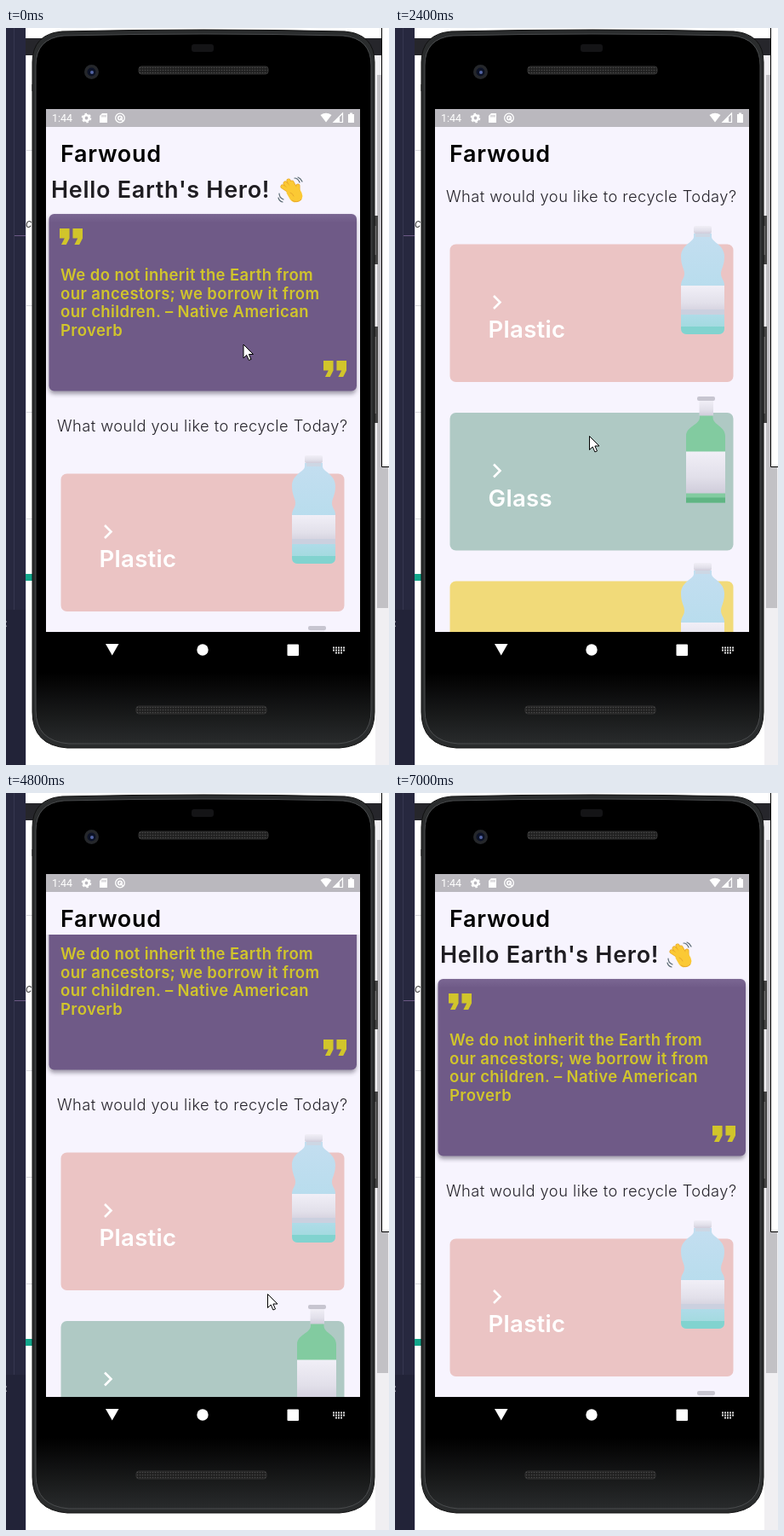
Write an HTML page that moves like this. It is 450 px wide and 864 px high and loops after 7.6 s.

```html
<!DOCTYPE html>
<html lang="en">
<head>
<meta charset="utf-8">
<title>Recycling app</title>
<style>
  html, body { margin: 0; width: 100%; height: 100%; overflow: hidden; background: #fff; }
  svg { display: block; width: 100vw; height: 100vh; }
  text { font-family: Inter, "Open Sans", sans-serif; white-space: pre; }
  .title { font-size: 27px; font-weight: 600; letter-spacing: .7px; }
  .hello { font-size: 27px; font-weight: 600; letter-spacing: .7px; fill: #1f1d22; }
  .quote { font-size: 18.5px; font-weight: 600; letter-spacing: .4px; fill: #d1c52b; }
  .ask { font-size: 18.3px; font-weight: 300; letter-spacing: .45px; fill: #26242b; }
  .label { font-size: 27.5px; font-weight: 600; letter-spacing: .3px; fill: #fff; }
  .clock { font: 12.5px Roboto, sans-serif; fill: #fff; }
</style>
</head>
<body>
<svg viewBox="0 0 450 864" preserveAspectRatio="none">
  <defs>
    <clipPath id="view"><rect x="47" y="166" width="369" height="542"/></clipPath>
    <linearGradient id="shell" x2="0" y2="1">
      <stop offset=".9" stop-color="#000"/><stop offset="1" stop-color="#292b2c"/>
    </linearGradient>
    <linearGradient id="card" x2="0" y2="1">
      <stop offset="0" stop-color="#7b6793"/><stop offset=".05" stop-color="#6f5a87"/>
    </linearGradient>
    <linearGradient id="paper" x2="0" y2="1">
      <stop offset="0" stop-color="#f1eff7"/><stop offset=".6" stop-color="#e2e0ea"/>
      <stop offset="1" stop-color="#cfccda"/>
    </linearGradient>
    <linearGradient id="water" x2="0" y2="1">
      <stop offset="0" stop-color="#c3def0"/><stop offset=".75" stop-color="#b4dcec"/>
      <stop offset="1" stop-color="#9ddadb"/>
    </linearGradient>
    <filter id="soft" x="-10%" y="-10%" width="120%" height="125%"><feGaussianBlur stdDeviation="2.5"/></filter>
    <pattern id="mesh" width="3" height="3" patternUnits="userSpaceOnUse">
      <rect width="3" height="3" fill="#202020"/><circle cx="1.5" cy="1.5" r=".8" fill="#484848"/>
    </pattern>

    <path id="marks" fill="#d1c52b" transform="scale(1.93 1.9)" d="M1 10h3l2-4V0H0v6h3zm8 0h3l2-4V0H8v6h3z"/>
    <path id="fingers" d="M334 192l-9-6M336 191l-8-9M338 190l-6-11M341 190l-5-9M343 195v-10"/>

    <g id="plastic">
      <path d="M351 510h21v4c0 6 15 9 15 23 0 11-4 14-4 20s4 7 4 14v50q0 7-7 7h-37q-7 0-7-7v-50c0-7 4-8 4-14s-4-9-4-20c0-14 15-17 15-23z" fill="url(#water)"/>
      <path d="M336 619h51v2q0 7-7 7h-37q-7 0-7-7z" fill="#81d3cf"/>
      <rect x="336" y="571" width="51" height="34" fill="url(#paper)"/>
      <rect x="336" y="599" width="51" height="6" fill="#cbd0df"/>
      <rect x="351" y="501" width="21" height="9" rx="2" fill="url(#paper)"/>
      <rect x="353" y="510" width="17" height="4" fill="#cdd7e4"/>
    </g>
    <g id="glass">
      <path d="M358 525h15.500v3c0 9 14.500 10 14.500 22v78h-46v-78c0-12 16-13 16-22z" fill="#82cba0"/>
      <rect x="342" y="622" width="46" height="6" fill="#5fb583"/>
      <rect x="342" y="568" width="46" height="49" fill="url(#paper)"/>
      <rect x="357.500" y="508" width="16.500" height="18" fill="url(#paper)"/>
      <rect x="355" y="503.500" width="21" height="5" rx="2" fill="#c7c5d0"/>
    </g>
  </defs>

  <!-- desktop behind the phone -->
  <rect width="450" height="864" fill="#fff"/>
  <rect x="23" y="12" width="418" height="20" fill="#26262b"/>
  <path d="M23 143.500h12M23 325.500h12M23 450.500h12M23 575.500h12" stroke="#dcdce0"/>
  <rect x="30" y="66" width="10" height="8" fill="#999"/>
  <rect width="23" height="864" fill="#27283f"/>
  <rect y="682" width="23" height="182" fill="#222338"/>
  <path d="M9.500 0v682" stroke="#35364f"/>
  <path d="M10 243.500h13" stroke="#6d5a86"/>
  <path d="M23.500 32v832" stroke="#d8d8e2"/>
  <rect x="23" y="640" width="9" height="8" fill="#12a68b"/>
  <text x="23" y="234" font-size="13" font-style="italic" fill="#444">c</text>
  <text x="-2" y="702" font-size="13" fill="#eee">:</text>
  <rect x="434" y="32" width="16" height="832" fill="#f0eff2"/>
  <rect x="436" y="55" width="13" height="625" fill="#c2c1c5"/>
  <path d="M441.500-1V514.500H451V-1z" fill="#fff" stroke="#000"/>

  <!-- phone -->
  <path d="M433 220h4v57h-4zM433 350h4v113h-4z" fill="#444"/>
  <path d="M434 232v34M434 362v90" stroke="#999"/>
  <path d="M31 40Q31 7 66 4Q232 0 398 4Q433 7 433 40V802Q433 841 392 844H72Q31 841 31 802z" fill="#2a2c2d" stroke="#111"/>
  <path d="M35 44Q35 12 68 9Q232 5 396 9Q429 12 429 44V800Q429 836 390 839H74Q35 836 35 800z" fill="url(#shell)" stroke="#4a4c4e"/>
  <circle cx="100.500" cy="51.500" r="8.500" fill="#25272b"/>
  <circle cx="100.500" cy="51.500" r="5" fill="#0c1226"/>
  <circle cx="101" cy="52" r="2" fill="#5465a5"/>
  <rect x="218" y="19" width="26" height="9" rx="3" fill="#141416"/>
  <rect x="156" y="45" width="152" height="9" rx="3" fill="url(#mesh)" stroke="#333"/>
  <rect x="153" y="795" width="153" height="9" rx="3" fill="url(#mesh)" stroke="#333"/>

  <!-- screen -->
  <rect x="47" y="95" width="369" height="613" fill="#f7f4fe"/>
  <rect x="47" y="95" width="369" height="21" fill="#bab8be"/>
  <text class="clock" x="54" y="110">1:44</text>
  <g fill="none" stroke="#fff">
    <circle cx="94.500" cy="105.500" r="3.200" stroke-width="2.600"/>
    <circle cx="94.500" cy="105.500" r="5" stroke-width="1.600" stroke-dasharray="2.600 2.636"/>
    <circle cx="134" cy="105.500" r="5.300" stroke-width="1.300"/>
    <circle cx="134" cy="105.500" r="2.300" stroke-width="1.500"/>
    <path d="M134 105.500l4 4M395.500 100v10.500H385z" stroke-width="1.200"/>
  </g>
  <path d="M113 100h6v11h-9v-8zM369.500 102q6.500-4.500 13 0l-6.500 8.500zM392 104v6.500h-7zM402 101h2v-1.500h3v1.500h2v10h-7z" fill="#fff"/>
  <path d="M113 102v2.500M115 102v2.500M117 102v2.500" stroke="#bab8be"/>
  <text class="title" x="64" y="157">Farwoud</text>

  <g clip-path="url(#view)">
    <g id="page">
      <text class="hello" x="53" y="199">Hello Earth's Hero!</text>
      <g fill="none" stroke-linecap="round" stroke-linejoin="round">
        <use href="#fingers" stroke="#e8a72b" stroke-width="5"/>
        <path d="M331 193q6-8 13-3 5 7 1 11-6 4-10-1z" fill="#fbc934" stroke="#fbc934" stroke-width="3"/>
        <use href="#fingers" stroke="#fbc934" stroke-width="3.600"/>
        <path d="M334 193q3 1 4 4M336 202q6 4 11-1" stroke="#e8a72b"/>
        <path d="M339 176q4 0 6 5M343 175q3 1 5 5M321 194q0 5 5 7M320 199q1 4 5 5" stroke="#5b6b74" stroke-width="1.200"/>
      </g>
      <rect x="50.500" y="221" width="361" height="208" rx="6" fill="#332b40" opacity=".45" filter="url(#soft)"/>
      <rect x="50.500" y="218" width="361.500" height="207.500" rx="6" fill="url(#card)"/>
      <use href="#marks" x="63" y="235"/>
      <use href="#marks" x="373" y="390"/>
      <text class="quote">
        <tspan x="64" y="296">We do not inherit the Earth from</tspan>
        <tspan x="64" dy="21.500">our ancestors; we borrow it from</tspan>
        <tspan x="64" dy="21.500">our children. – Native American</tspan>
        <tspan x="64" dy="21.500">Proverb</tspan>
      </text>
      <text class="ask" x="60" y="473">What would you like to recycle Today?</text>
      <g id="cards"></g>
    </g>
  </g>

  <!-- navigation bar -->
  <g fill="#fff">
    <path d="M117 722h15.500l-7.750 13.500z"/>
    <circle cx="231" cy="729" r="6.700"/>
    <rect x="330.500" y="722.500" width="13.500" height="13.500" rx="1"/>
    <path d="M384 726.500h14M384 729.500h14M387 732.500h8" stroke="#ddd" stroke-width="1.800" stroke-dasharray="2 1"/>
  </g>

  <path id="cursor" d="M0 0v16l3.700-3.500 2.700 6 2.600-1.100-2.600-5.900h5.100z" fill="#fff" stroke="#000" stroke-linejoin="round"/>
</svg>
<script>
  const LOOP = 7600, STEP = 100, CARD_GAP = 197.5;
  const $ = id => document.getElementById(id);

  const card = (color, label, bottle, i) => `
    <g transform="translate(0 ${i * CARD_GAP})">
      <rect x="64.5" y="522.5" width="333" height="161.5" rx="7" fill="${color}"/>
      <path d="M116 583l7.5 7.5-7.5 7.5" fill="none" stroke="#fff" stroke-width="2.6"/>
      <text class="label" x="109.5" y="632">${label}</text>
      <use href="#${bottle}"/>
    </g>`;
  $("cards").innerHTML =
    card("#ebc4c4", "Plastic", "plastic", 0) +
    card("#afc9c4", "Glass", "glass", 1) +
    card("#f1da79", "", "plastic", 2);

  // Progress from 0 to 1 between two times, slow at both ends.
  function ease(t, from, to) {
    const p = Math.min(1, Math.max(0, (t - from) / (to - from)));
    return p * p * (3 - 2 * p);
  }

  function scrollAt(t) {
    if (t < 2400) return 0;
    if (t < 4100) return 269 + 26 * ease(t, 3300, 3900);
    return 101 * (1 - ease(t, 6600, 6900));
  }

  const moves = [
    { from: 300, to: 1100, x: 246, y: 463 },
    { from: 1200, to: 1700, x: 240, y: 394 },
    { from: 2300, to: 2400, x: 228, y: 478 },
    { from: 2500, to: 3700, x: 249, y: 163 },
    { from: 4000, to: 4800, x: 307, y: 587 },
    { from: 4800, to: 5500, x: 228, y: 412 },
    { from: 5500, to: 5700, x: 228, y: 495 },
    { from: 6600, to: 7000, x: 232, y: 900 },
  ];

  function pointerAt(t) {
    if (t < moves[0].from) return [279, 371];
    let x = 279, y = 371;
    for (const m of moves) {
      const p = ease(t, m.from, m.to);
      x += (m.x - x) * p;
      y += (m.y - y) * p;
    }
    return [x + .5, y + .5];
  }

  const start = performance.now();

  function draw() {
    const now = Math.max(0, performance.now() - start) % LOOP;
    const t = Math.floor(now / STEP) * STEP;
    $("page").setAttribute("transform", `translate(0 ${-scrollAt(t)})`);
    $("cursor").setAttribute("transform", `translate(${pointerAt(t)})`);
    requestAnimationFrame(draw);
  }
  draw();
</script>
</body>
</html>
```
